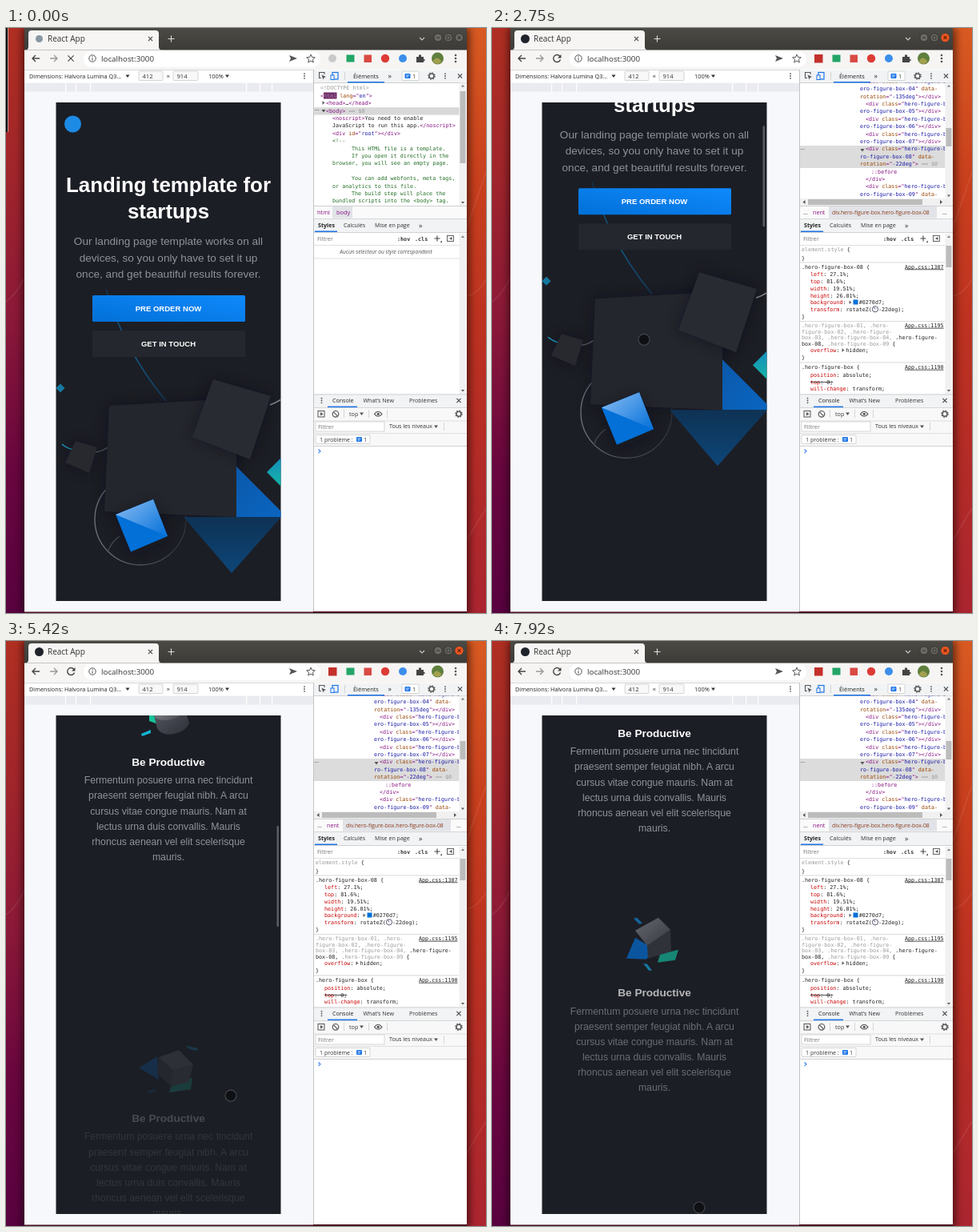
Write an HTML page that moves like this. It is 600 px wide and 731 px high and loops after 8000 ms.

```html
<!DOCTYPE html>
<html lang="en">
<head>
<meta charset="utf-8">
<title>React App</title>
<style>
html, body { margin: 0; width: 100%; height: 100%; overflow: hidden; background: #8a1538; }
svg { display: block; width: 600px; height: 731px; }
text { white-space: pre; font-family: 'Open Sans', 'Noto Sans', sans-serif; }
.m { font: 6.72px 'DejaVu Sans Mono', monospace; }
.a { font-family: 'Liberation Sans', Arial, sans-serif; text-anchor: middle; }
.b { font-weight: bold; }
</style>
</head>
<body>
<svg id="stage" viewBox="0 0 600 731" xmlns="http://www.w3.org/2000/svg"></svg>
<script>
const LOOP = 8000;
const GREY = '#8f929a';
const esc = s => s.replace(/&/g, '&amp;').replace(/</g, '&lt;');
const rect = (x, y, w, h, fill, more = '') =>
  `<rect x="${x}" y="${y}" width="${w}" height="${h}" fill="${fill}" ${more}/>`;
const circ = (x, y, r, fill, more = '') => `<circle cx="${x}" cy="${y}" r="${r}" fill="${fill}" ${more}/>`;
const poly = (pts, fill, more = '') => `<polygon points="${pts}" fill="${fill}" ${more}/>`;
const line = (d, stroke, w = 1, more = '') =>
  `<path d="${d}" fill="none" stroke="${stroke}" stroke-width="${w}" ${more}/>`;
const text = (x, y, s, size, fill = '#333', more = '') =>
  `<text x="${x}" y="${y}" font-size="${size}" fill="${fill}" ${more}>${esc(s)}</text>`;
const grad = (id, x1, y1, x2, y2, ...stops) =>
  `<linearGradient id="${id}" x1="${x1}" y1="${y1}" x2="${x2}" y2="${y2}">` +
  stops.map((c, i) => `<stop offset="${i / (stops.length - 1)}" stop-color="${c}"/>`).join('') + '</linearGradient>';
const clip = (id, x, y, w, h) => `<clipPath id="${id}">${rect(x, y, w, h, '#000')}</clipPath>`;
const group = (id, inner, more = '') => `<g id="${id}" ${more}>${inner}</g>`;

// Coloured code: segments split by "|", first letter picks the colour.
const INK = { t: '#881280', a: '#994500', v: '#1a1aa6', k: '#222', g: '#9a9a9a', c: '#236e25', r: '#c80000' };
const code = (x, y, s, more = '') => `<text class="m" x="${x}" y="${y}" ${more}>` +
  s.split('|').map(p => `<tspan fill="${INK[p[0]]}">${esc(p.slice(1))}</tspan>`).join('') + '</text>';

const down = (x, y, c = '#555') => poly(`${x - 2.5},${y - 1.5} ${x + 2.5},${y - 1.5} ${x},${y + 2}`, c);
const cross = (x, y, r = 2.6, c = '#444') =>
  line(`M${x - r} ${y - r}L${x + r} ${y + r}M${x + r} ${y - r}L${x - r} ${y + r}`, c, 1.1);
const dots = (x, y, gap = 2.8, r = .9) => [-1, 0, 1].map(i => circ(x, y + i * gap, r, '#555')).join('');
const gear = (x, y) => circ(x, y, 3, 'none', 'stroke="#5a5a5a" stroke-width="1.6"') +
  circ(x, y, 4.2, 'none', 'stroke="#5a5a5a" stroke-width="1.2" stroke-dasharray="1.6 1.7"');
const badge = (x, y) => rect(x - 3.5, y - 3.5, 7, 6, '#1a73e8', 'rx="1"') +
  line(`M${x - 2} ${y - 1.5}h4M${x - 2} ${y + .5}h3`, '#fff', .8);
const hline = (y, c = '#ccc', x = 385, w = 191) => rect(x, y, w, .9, c);
const scroller = (x, y, h, ty, th) => rect(x, y, 9, h, '#f1f1f1') + (th ? rect(x + 1, ty, 7, th, '#bcbcbc') : '') +
  poly(`${x + 2.5},${y + 5} ${x + 6.5},${y + 5} ${x + 4.5},${y + 2.5}`, '#777') +
  poly(`${x + 2.5},${y + h - 5} ${x + 6.5},${y + h - 5} ${x + 4.5},${y + h - 2.5}`, '#555');

function defs() {
  return '<defs>' +
    grad('wallL', 0, 0, 0, 1, '#b02f22', '#a0252b', '#8a1838', '#69063f', '#58023f') +
    grad('wallR', 0, 0, 0, 1, '#d85a22', '#c9401d', '#bd3220', '#b32b27', '#ab2530') +
    grad('bar', 0, 0, 0, 1, '#4b4a45', '#3c3b37') +
    grad('cta', 0, 1, 1, 0, '#0270d7', '#0f8afd') +
    grad('shine', 0, 0, 1, .8, '#8bbcf0', '#4e9be8', '#0f76da') +
    grad('tri', 0, 0, 1, 1, '#0b59aa', '#0a66c2') +
    grad('tip', 0, 0, 0, 1, '#0e3254', '#0d4679') +
    grad('teal', 0, 0, 0, 1, '#1680c8', '#14c29a') +
    grad('metal', 0, 0, 1, 1, '#8a8c95', '#44464f') +
    grad('dark', 0, 0, 1, 1, '#565862', '#2e3038') +
    grad('ring', 0, 0, 1, 0, '#70737c', '#30333b') +
    grad('arc', 0, 0, 0, 1, '#123049', '#116295', '#123c5c') +
    '<filter id="soft" x="-40%" y="-40%" width="180%" height="180%"><feGaussianBlur stdDeviation="9"/></filter>' +
    '<filter id="edge" x="-5%" y="-5%" width="110%" height="110%"><feGaussianBlur stdDeviation="5"/></filter>' +
    clip('phone', 62.5, 93, 281, 623) + clip('tree', 385, 68.5, 181.5, 153.5) + clip('tree2', 385, 68.5, 181.5, 145) +
    clip('css', 385, 271, 181.5, 186) + '</defs>';
}

function wallpaper() {
  return rect(0, 0, 300, 731, 'url(#wallL)') + rect(300, 0, 300, 731, 'url(#wallR)') +
    line('M0 342Q12 334 24 310M576 335Q590 332 600 314M576 250L600 180M576 640L600 600', '#fff', 2, 'opacity=".07"') +
    rect(20, 0, 560, 734, '#000', 'opacity=".5" filter="url(#edge)"') +
    rect(23, 729, 553, 2, '#4a1022') + rect(23, 0, 553, 729, '#f6f5f4');
}

function browser() {
  let s = rect(23, 0, 553, 27.5, 'url(#bar)') +
    '<path d="M25 27.5Q28 27 28 23V7Q28 3 32 3H187Q191 3 191 7V23Q191 27 194 27.5Z" fill="#f6f5f4"/>' +
    text(52, 17.2, 'React App', 10) + cross(180.5, 13.5) +
    line('M202.5 13.5h8M206.5 9.5v8', '#ddd', 1.1) + line('M517 12l3 3 3-3', '#ccc', 1.1);
  s += line('M42 38H33M37 34l-4 4 4 4', '#444', 1.4) + line('M55 38h9M60 34l4 4-4 4', '#999', 1.4);
  s += rect(97, 28.5, 296, 20.5, '#fff', 'rx="10"') + circ(108, 38, 4.2, 'none', 'stroke="#555"') +
    line('M108 37.5v3M108 35.2v1.2', '#555', 1.1) + text(119, 41.6, 'localhost:3000', 9.8);
  s += poly('354,34 364,38 354,42 356,38', '#555') +
    '<path d="M381 33l1.5 3.5 3.8.3-2.9 2.5.9 3.7-3.3-2-3.3 2 .9-3.7-2.9-2.5 3.8-.3z" fill="none" stroke="#555"/>';
  s += rect(425.5, 33.5, 10, 9, '#23a566') + rect(447.5, 33.5, 9.5, 9.5, '#d84a43') + circ(474, 38, 5.2, '#dd3b35') +
    circ(496, 38, 5, '#3b8eea') +
    '<path d="M513 36h3v-2.5h3V36h3v3h1.5v2H522v2h-9z" fill="#444"/>' +
    circ(539.5, 38, 7.5, '#5f7f3d') + '<path d="M533.5 42q5-9 11 0-5 6-11 0z" fill="#a2a04f"/>' + dots(562, 38, 4, 1.3);
  s += rect(23, 52, 361, 16.5, '#fff') + hline(52, '#d5d5d5', 23, 553) +
    text(29, 62.6, 'Dimensions: Halvora Lumina Q3…', 7.3, '#222') + down(152, 60, '#333') +
    [[166, '412', 30], [209, '914', 31]].map(([x, n, w]) =>
      rect(x, 54, w, 11.5, '#f8f8f8', 'stroke="#ccc" stroke-width=".8" rx="1"') + text(x + 4.5, 62.6, n, 7.6)).join('') +
    text(200.5, 62.8, '×', 8) + text(253, 62.6, '100%', 7.4, '#222') + down(276.5, 60, '#333') + dots(373, 60) +
    rect(23, 68.5, 361, 661, '#f7f8fb') + rect(23, 69, 361, 10.5, '#eaebf0') +
    [74, 87, 105, 300, 317, 332].map(x => rect(x, 69, 1.2, 10.5, '#fff')).join('');
  const greyBtn = x => circ(x, 12, 5, '#6b6a65', 'stroke="#33322e" stroke-width=".8"');
  s += [540, 553, 566.5].map(greyBtn).join('') + line('M538 12h4M551 10h4v4h-4z', '#33322e', 1);
  const before = circ(41.5, 13.5, 4.5, '#8796a0') + cross(81, 38, 3.6) + circ(408, 38, 5, '#c9c9c9') +
    cross(566.5, 12, 1.8, '#33322e') + rect(0, 0, 2, 130, '#0b0b0b') + rect(2, 0, .7, 130, '#ddd');
  const after = circ(41.5, 13.5, 5.5, '#20232a') +
    line('M85 35.5A4.5 4.5 0 1 0 85.5 39.5', '#444', 1.4) + poly('86.5,33 86.5,37.5 82,37.5', '#444') +
    rect(403, 33, 10.5, 10.5, '#c4302b') + circ(566.5, 12, 5.2, '#e95420') + cross(566.5, 12, 1.8, '#5a1d08');
  return s + group('tabOld', before) + group('tabNew', after);
}

const row = i => 77.4 + 9.4 * i;

function treeOld() {
  const lines = [
    [393, 'g<!DOCTYPE html>'], [393, 't<html |alang|t="|ven|t">'], [400, 't<head>|k…|t</head>'], [400, 't<body>|g == $0'],
    [408, 't<noscript>|kYou need to enable'], [408, 'kJavaScript to run this app.|t</noscript>'],
    [408, 't<div |aid|t="|vroot|t"></div>'], [408, 'c<!--'], [432, 'cThis HTML file is a template.'],
    [432, 'cIf you open it directly in the'], [408, 'cbrowser, you will see an empty page.'], [408, 'c'],
    [432, 'cYou can add webfonts, meta tags,'], [408, 'cor analytics to this file.'],
    [432, 'cThe build step will place the'], [408, 'cbundled scripts into the <body> tag.']];
  return '<g clip-path="url(#tree)">' + rect(385, 99.2, 182, 9.4, '#d8d8d8') + rect(397, 80.5, 16.5, 8, '#6e2a66') +
    lines.map(([x, s], i) => code(x, row(i), s)).join('') +
    code(397, row(1), 'ghtml') +
    poly('395.5,91 395.5,96 398.5,93.5', '#666') + down(397, 103.6) + text(386, 105, '···', 7) + '</g>' +
    scroller(566.5, 68.5, 153.5, 79, 90) +
    rect(408, 223, 25, 14.5, '#e1e3e8') + text(389, 232.8, 'html', 7.4, INK.t) + text(413, 232.8, 'body', 7.4, INK.t) +
    text(475, 282.4, 'Aucun sélecteur ou style correspondant', 6.7, '#555', 'text-anchor="middle" font-style="italic"') +
    hline(287.5, '#ddd') + scroller(566.5, 257, 200, 0, 0);
}

function treeNew() {
  const open = [467, 't<div |aclass|t="|vhero-figure-box'];
  const box = (n, rest) => [460, `vero-figure-box-0${n}|t"${rest}`];
  const lines = [open, box(4, '|a data-'), [460, 'arotation|t="|v-135deg|t"></div>'],
    open, box(5, '></div>'), open, box(6, '></div>'), open, box(7, '></div>'),
    open, [460, 'vro-figure-box-08|t"|a data-'], [460, 'arotation|t="|v-22deg|t">|g == $0'], [474, 't::before'], [467, 't</div>'],
    open, box(9, '|a data-')];
  const css = [
    [387, 279, 'gelement.style |k{'], [387, 289.5, 'k}'],
    [387, 300.5, 'k.hero-figure-box-08 {'], [398, 310, 'rleft|k: 27.1%;'], [398, 319, 'rtop|k: 81.6%;'], [398, 328, 'rwidth|k: 19.51%;'],
    [398, 336.5, 'rheight|k: 26.01%;'], [398, 345.3, 'rbackground|k:    #0270d7;'], [398, 354, 'rtransform|k: rotateZ(  -22deg);'], [387, 362.5, 'k}'],
    [387, 373.8, 'g.hero-figure-box-01, .hero-'], [387, 381.5, 'gfigure-box-02, .hero-figure-'],
    [387, 389, 'gbox-03, .hero-figure-box-04, |k.hero-figure-'], [387, 396.5, 'kbox-08, |g.hero-figure-box-09 |k{'],
    [398, 405, 'roverflow|k:  hidden;'], [387, 413.5, 'k}'],
    [387, 425.8, 'k.hero-figure-box {'], [398, 436, 'rposition|k: absolute;'], [398, 452.8, 'rwill-change|k: transform;']];
  const ref = (y, n) => code(516, y, `kApp.css:${n}`, 'text-decoration="underline"');
  return '<g clip-path="url(#tree2)">' + rect(385, 147, 182, 28, '#dcdcdc') +
    lines.map(([x, s], i) => code(x, row(i - 1) + .8, s)).join('') +
    down(463, 152.6) + text(385.5, 153.6, '···', 7) + '</g>' +
    scroller(566.5, 68.5, 145, 125, 23) + rect(385, 213, 191, 9, '#f1f1f1') + rect(395, 214, 143, 7, '#bcbcbc') +
    poly('391.5,215 391.5,220 388.5,217.5', '#555') + poly('560,215 560,220 563,217.5', '#555') +
    rect(421, 223, 135, 14.5, '#e1e3e8') + text(389, 232.8, '…', 7.4) + text(401, 232.8, 'nent', 7.2, INK.t) +
    text(425, 232.8, 'div.hero-figure-box.hero-figure-box-08', 6.85, '#8a3a18') + text(563, 232.8, '…', 7.4) +
    '<g clip-path="url(#css)">' + css.map(([x, y, s]) => code(x, y, s)).join('') +
    code(398, 444.5, 'rtop|k: 0;', 'text-decoration="line-through"') +
    ref(300.5, 1307) + ref(373.8, 1195) + ref(425.8, 1190) +
    [292.5, 366, 417.5].map(y => hline(y, '#d5d5d5')).join('') +
    rect(451.5, 339.5, 6, 6, '#0270d7') + circ(479, 351.3, 3.6, '#fff', 'stroke="#446" stroke-width=".9"') +
    line('M479 351.3l-1.5-2.5', '#446', .9) + poly('446.5,340.5 446.5,345 449.5,342.8', '#666') +
    poly('437.5,400.3 437.5,405 440.5,402.6', '#666') + '</g>' + scroller(566.5, 257, 200, 272, 27);
}

function devtools() {
  const tone = '#f1f3f4';
  let s = rect(384.5, 52, 191.5, 677, '#fff') + rect(384, 52, .9, 677, '#bbb') +
    rect(385, 52.5, 191, 16, tone) + hline(68) + rect(385, 222, 191, 16, '#fafafa') + hline(222) + hline(238) +
    rect(385, 238.9, 191, 16, tone) + hline(255) + hline(271, '#ddd') +
    rect(385, 457.5, 191, 16.5, tone) + hline(457.5) + hline(474) + rect(385, 474.9, 191, 47, '#f8f8f8') +
    hline(490.5, '#ddd') + hline(506, '#ddd') + hline(522);
  s += group('lit', rect(402, 53, 17, 15, '#dbe2ee')) +
    line('M398 58v-2.5h-6.5v7H394', '#555', 1.1) + poly('394.5,58.5 400,61 397.5,62 396.5,64.5', '#555') +
    rect(408, 55.5, 7, 8.5, 'none', 'stroke="#1a73e8" stroke-width="1.2"') + rect(406, 59, 4, 5.5, '#fff', 'stroke="#1a73e8"') +
    rect(423, 55, .8, 10, '#ccc') + text(434, 62.5, 'Éléments', 7.4, '#222') + rect(427, 67, 46, 1.5, '#1a73e8') + text(477.5, 62.8, '»', 9) +
    rect(495, 54, 21, 11.5, '#fff', 'stroke="#ccc" stroke-width=".8" rx="1"') + badge(502, 60.5) + text(508, 62.6, '1', 7.2) +
    gear(532, 60) + dots(549, 60) + cross(567.5, 60);
  s += text(390, 249.3, 'Styles', 7.1, '#222', 'class="b"') + rect(386, 253.5, 28, 1.5, '#1a73e8') +
    text(422, 249.3, 'Calculés', 7.1) + text(461, 249.3, 'Mise en page', 7.1) + text(516, 249.5, '»', 9) +
    rect(386, 257, 97, 12.5, '#fff') + text(389, 265.8, 'Filtrer', 7.3, '#777') +
    text(489, 265.5, ':hov', 6.8, '#333', 'class="m b"') + text(511, 265.5, '.cls', 6.8, '#333', 'class="m b"') +
    line('M535.5 263h7M539 259.5v7', '#444', 1.1) + poly('545,268 545,265.5 542.5,268', '#555') +
    rect(551.5, 259.5, 8, 7, 'none', 'stroke="#555" stroke-width=".9"') + poly('557.5,261 557.5,265 554,263', '#555');
  s += dots(394.5, 465.5) + text(408, 468.3, 'Console', 7.1, '#222') + rect(402, 472.6, 37, 1.5, '#1a73e8') +
    text(446.5, 468.3, 'What’s New', 7.1) + text(504, 468.3, 'Problèmes', 7.1) + cross(566, 465.5) +
    rect(390, 478.5, 8, 7.5, 'none', 'stroke="#555"') + poly('393,480 393,484.5 396.5,482.3', '#555') +
    circ(412, 482.3, 3.8, 'none', 'stroke="#555" stroke-width="1.2"') + line('M409.5 479.8l5 5', '#555', 1.2) +
    rect(422, 477, .8, 10, '#ccc') + text(429, 485, 'top', 7.2) + down(444.5, 482) + rect(453, 477, .8, 10, '#ccc') +
    line('M460.5 482.3q4.5-6 9.5 0-5 6-9.5 0z', '#555', 1.1) + circ(465.2, 482.3, 1.6, '#555') +
    rect(476, 477, .8, 10, '#ccc') + gear(566, 482.3) +
    rect(387, 492, 86, 12, '#fff', 'stroke="#ccc" stroke-width=".8"') + text(390, 500.8, 'Filtrer', 7.3, '#777') +
    text(479, 500.3, 'Tous les niveaux', 7.1) + down(537.5, 498) + rect(547, 493, .8, 10, '#ccc') +
    rect(387, 508.5, 68, 11, '#fff', 'stroke="#ccc" stroke-width=".8" rx="1"') + text(392, 516.5, '1 problème :', 7.1) +
    badge(441.5, 514.5) + text(447, 516.6, '1', 7.2) + line('M390.5 526.5l2.5 2.3-2.5 2.3', '#367cf1', 1.1);
  return s + group('treeOld', treeOld()) + group('treeNew', treeNew());
}

function hero() {
  const mid = (y, s, size, fill, cls = 'a') => text(203, y, s, size, fill, `class="${cls}"`);
  const shade = pts => poly(pts, '#0e1015', 'opacity=".45" filter="url(#soft)"');
  const big = '129,472 288,463 288,611 123,604', side = '259,439 331,460 305,539 233,511', small = '87,516 114,524 104,556 74,543';
  return line('M125 326Q147 402 200 466', 'url(#arc)', 1.5) +
    poly('68,444.5 73.5,450 68,455.5 62.5,450', '#1479a0') +
    circ(168, 614, 57, 'none', 'stroke="url(#ring)" stroke-width="1.3"') + line('M127 655Q131 643 142 635', '#4a4d55', 1.1) +
    line('M70 520Q77 526 85 527', '#1aa3c9', 1.4) + line('M112 530Q120 529 127 524', '#5c5f68', 1.4) +
    shade(big) + poly(big, '#24262d') + line('M330 471Q342 467 360 453', '#8b8e96', 1.5) +
    shade(side) + poly(side, '#292b32') + shade(small) + poly(small, '#27292f') +
    poly('288,548 351,611 288,611', 'url(#tri)') + poly('222,611 344,611 282,681', 'url(#tip)') +
    poly('326,555 356,525 356,585', 'url(#teal)') + shade('184,592 204,638 158,660 137,612') +
    poly('184,589 202,635 156,654.5 137,608', '#0270d7') + poly('137,608 184,589 202,635', 'url(#shine)') +
    mid(205.2, 'Landing template for', 25.9, '#fff', 'a b') + mid(238.2, 'startups', 25.9, '#fff', 'a b') +
    ['Our landing page template works on all', 'devices, so you only have to set it up', 'once, and get beautiful results forever.']
      .map((s, i) => mid(271.3 + 20.5 * i, s, 13.64, GREY)).join('') +
    rect(108, 334, 191, 33, 'url(#cta)', 'rx="1.5"') + mid(354, 'PRE ORDER NOW', 9.55, '#fff', 'a b') +
    rect(108, 378, 191, 33, '#24272e', 'rx="1.5"') + mid(397.5, 'GET IN TOUCH', 9.55, '#fff', 'a b');
}

// Feature icons, placed relative to the centre of the feature title.
const icons = [
  () => poly('-16,-89 20,-78 12,-64 -29,-67', '#0270d7') + poly('-24,-82 -13,-76 -13,-47 -24,-51', '#14c29a') +
    '<path d="M-18-58L-14-42A21 14 -15 0 0 26-49L20-67Z" fill="url(#dark)"/>' +
    '<ellipse cx="1" cy="-63" rx="19.5" ry="10.5" fill="url(#metal)" transform="rotate(-13 1 -63)"/>' +
    poly('-34,-35 -22,-40 -22,-36 -33,-32', '#12b5d6') + poly('27,-69 37,-65 37,-62 29,-65', '#10507e'),
  () => poly('-37,-63 -14,-77 -12,-48', '#0270d7') + poly('3,-39 30,-51 28,-36 1,-32', '#14b89c') +
    poly('-12,-76 13,-85 31,-67 25,-45 3,-40 -14,-56', '#4a4c55') + poly('-12,-76 13,-85 31,-67 6,-60', '#777982') +
    poly('6,-60 31,-67 25,-45 3,-40', '#5f616b') + poly('22,-91 37,-87 35,-84 25,-87', '#12a5dc') + poly('-26,-34 -17,-37 -15,-34 -24,-31', '#0f5a88'),
  () => poly('-24,-69 -35,-43 -10,-42 -2,-52 -9,-60', '#0270d7') + poly('7,-48 30,-54 26,-41 4,-38', '#14b89c') +
    poly('-9,-59 20,-79 21,-52 -8,-43', '#3a3c44') + poly('-24,-78 5,-94 20,-79 -9,-59', 'url(#metal)') +
    poly('-26,-93 -22,-94 -15,-87 -19,-86', '#1184d8') + poly('-14,-37 -9,-36 -3,-28 -7,-28', '#12a5dc')];
const copy = ['Fermentum posuere urna nec tincidunt', 'praesent semper feugiat nibh. A arcu', 'cursus vitae congue mauris. Nam at',
  'lectus urna duis convallis. Mauris', 'rhoncus aenean vel elit scelerisque', 'mauris.'];
const feature = (icon, i) => group('feat' + i, icon() + text(0, 4.7, 'Be Productive', 13.64, '#fff', 'class="a b"') +
  copy.map((s, n) => text(0, 27.3 + 19.1 * n, s, 12.27, GREY, 'class="a"')).join(''));

function phone() {
  return rect(62.5, 93, 281, 623, '#1c1e25') + '<g clip-path="url(#phone)">' +
    group('page', circ(83.5, 120, 10.5, '#1c8be6') + group('hero', hero()) + icons.map(feature).join('')) +
    group('thumb', rect(338.5, 0, 2.5, 126, '#5a5c64', 'rx="1.2"')) +
    group('dot', circ(0, 0, 7, '#0f1014', 'stroke="#43454c" stroke-width="1.2"')) + '</g>';
}

const stage = document.getElementById('stage');
stage.innerHTML = defs() + wallpaper() + browser() + phone() + devtools();
const el = {};
stage.querySelectorAll('g[id]').forEach(g => { el[g.id] = g; });

// Ease curve cubic-bezier(.5, 0, 0, 1)
function ease(x) {
  if (x <= 0) return 0;
  if (x >= 1) return 1;
  let lo = 0, hi = 1, u;
  for (let i = 0; i < 24; i++) {
    u = (lo + hi) / 2;
    if (1.5 * u * (1 - u) ** 2 + u ** 3 < x) lo = u; else hi = u;
  }
  return 3 * u * u - 2 * u ** 3;
}
function track(keys, t, k) {
  let i = 0;
  while (i < keys.length - 1 && keys[i + 1][0] <= t) i++;
  const a = keys[i], b = keys[i + 1] || a;
  const f = b === a ? 0 : Math.max(0, (t - a[0]) / (b[0] - a[0]));
  return a[k] + (b[k] - a[k]) * f;
}

const SCROLL = [[2500, 0], [2750, 133], [2950, 270], [3150, 345], [3400, 394], [4500, 394], [4750, 520], [4950, 615],
  [5200, 668], [6620, 668], [6900, 820], [7150, 915], [7420, 948]];
const POINTER = [[1900, 338, 430], [2300, 192, 532], [2500, 190, 523], [2750, 190, 390], [2950, 190, 253], [3250, 198, 260],
  [4250, 235, 514], [4500, 240, 590], [4750, 258, 464], [4950, 270, 390], [5420, 281, 568], [6170, 240, 597],
  [6620, 245, 640], [6900, 254, 488], [7100, 258, 430], [7500, 261, 540], [7920, 259, 708]];
const SCROLLS = [[2500, 3400], [4500, 5200], [6620, 7420]];
const REVEAL = [3250, 5180, 7548];
const HERO_FROM = .2;

const show = (g, on) => g.setAttribute('display', on ? 'inline' : 'none');
const fade = (g, a) => g.setAttribute('opacity', a.toFixed(3));
const move = (g, x, y, more = '') => g.setAttribute('transform', `translate(${x} ${y})${more}`);

function draw(t) {
  const loaded = t >= 300;
  show(el.tabOld, !loaded);
  show(el.tabNew, loaded);
  show(el.treeOld, !loaded);
  show(el.treeNew, loaded);
  show(el.lit, t > 700 && t < 1700);

  const y = track(SCROLL, t, 1);
  move(el.page, 0, -y);
  const p = t < 170 ? 1 : ease((t - 375) / 1000);
  fade(el.hero, p);
  move(el.hero, 203, 413, ` scale(${HERO_FROM + (1 - HERO_FROM) * p}) translate(-203 -413)`);
  REVEAL.forEach((start, i) => {
    const q = ease((t - start) / 1000);
    fade(el['feat' + i], q);
    move(el['feat' + i], 203, 819 + 244 * i + 250 * (1 - q));
  });

  const bar = Math.max(...SCROLLS.map(([a, b]) => t < a ? 0 : Math.min(1, Math.max(0, (b + 480 - t) / 220))));
  fade(el.thumb, bar);
  move(el.thumb, 0, 95 + y * .2037);
  show(el.dot, t >= 1900);
  move(el.dot, track(POINTER, t, 1), track(POINTER, t, 2));
}

const begin = performance.now();
function tick() {
  draw((performance.now() - begin) % LOOP);
  requestAnimationFrame(tick);
}
draw(0);
requestAnimationFrame(tick);
</script>
</body>
</html>
```
